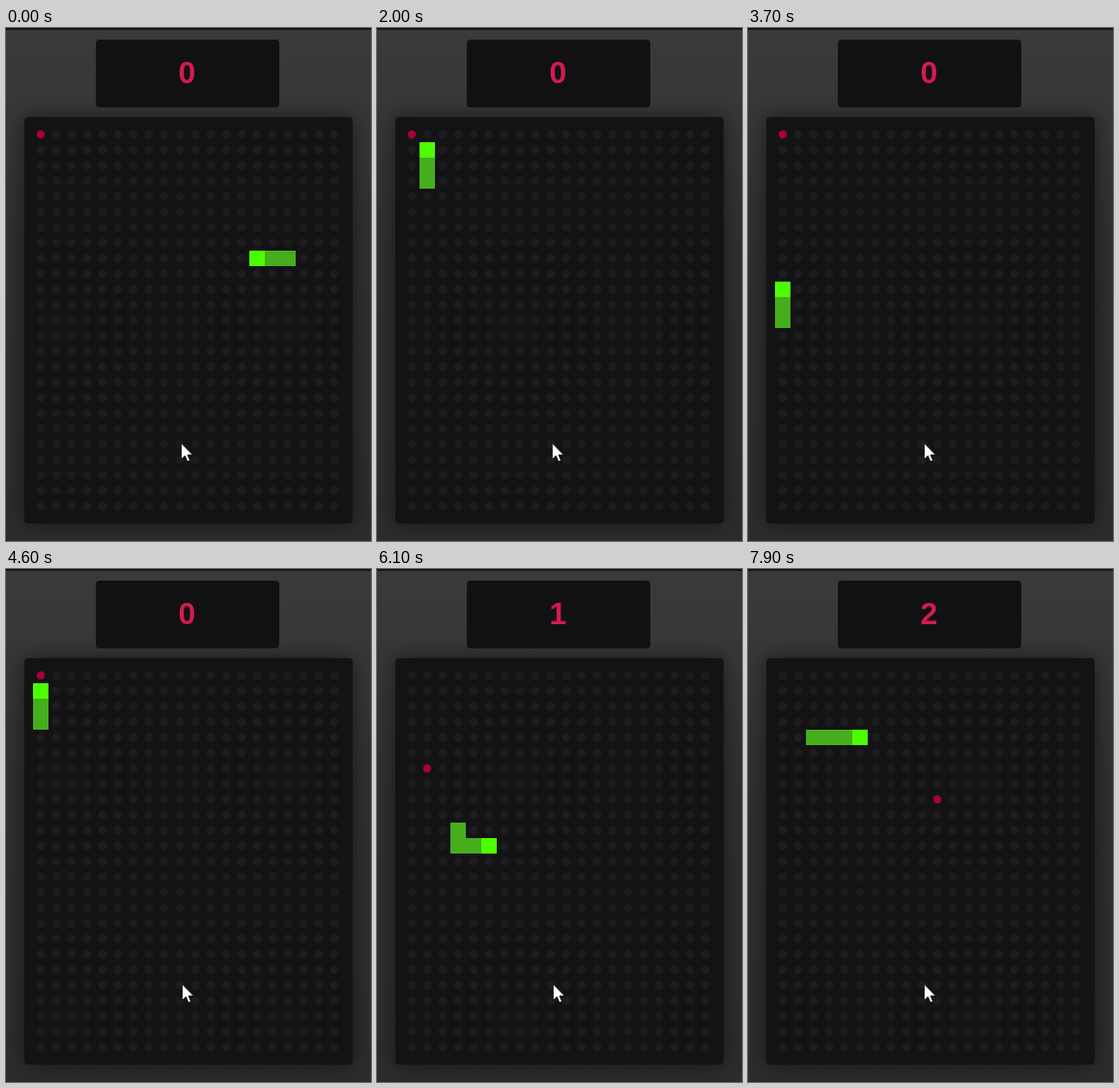
An HTML page for the animation above (8 s loop, 378 by 530 pixels).

```html
<!DOCTYPE html>
<html lang="en">
<head>
<meta charset="utf-8">
<title>Snake</title>
<style>
  html, body { margin: 0; width: 100%; height: 100%; overflow: hidden; background: #2c2b2d; }
  svg { display: block; width: 378px; height: 530px; }
  text { font: bold 32px "Liberation Sans", Arial, sans-serif; fill: #d11c4f; text-anchor: middle; }
</style>
</head>
<body>
<svg viewBox="0 0 378 530">
  <defs>
    <linearGradient id="page" x2="0" y2="1">
      <stop offset="0" stop-color="#3b393b"/>
      <stop offset=".15" stop-color="#383638"/>
      <stop offset=".4" stop-color="#302f31"/>
      <stop offset="1" stop-color="#2c2c2e"/>
    </linearGradient>
    <filter id="blur" x="-20%" y="-20%" width="140%" height="140%">
      <feGaussianBlur stdDeviation="10"/>
    </filter>
    <pattern id="dots" x="28" y="102" width="16" height="16" patternUnits="userSpaceOnUse">
      <circle cx="8" cy="8" r="4.4" fill="#1c1c1e"/>
    </pattern>
  </defs>
  <rect width="378" height="530" fill="url(#page)"/>
  <rect width="378" height="2" fill="#161518"/>
  <rect x="19" y="92" width="340" height="420" fill="#000" opacity=".5" filter="url(#blur)"/>
  <rect x="93" y="12" width="190" height="70" rx="4" fill="#111113"/>
  <rect x="19" y="92" width="340" height="420" rx="4" fill="#131315"/>
  <rect x="28" y="102" width="320" height="400" fill="url(#dots)"/>
  <text id="score" x="187.5" y="57">0</text>
  <g shape-rendering="crispEdges">
    <path id="body" fill="#46ad1c"/>
    <path id="head" fill="#4cff00"/>
  </g>
  <circle id="food" r="4.2" fill="#a60038"/>
  <path id="cursor" d="M0 0V16.5L3.9 12.9L6.4 18.8L9 17.7L6.5 12H11.8Z"
        fill="#fff" stroke="#111" stroke-width=".8"/>
</svg>
<script>
  const LOOP = 8000, TICK = 100, CELL = 16, COLS = 20, ROWS = 25, LEFT = 28, TOP = 102;
  const DIRS = { L: [-1, 0], R: [1, 0], U: [0, -1], D: [0, 1] };
  const ROUTE = "L15 U13 L1 U19 R3 D10 R3 U3 L5 U4 R4";
  const FOODS = [
    { tick: 0, at: [0, 0] },
    { tick: 48, at: [1, 6] },
    { tick: 73, at: [10, 8] }
  ];
  const START_LENGTH = 3;
  const $ = id => document.getElementById(id);

  // The trail begins with the tail cell of the first pose; edges wrap around.
  const trail = [[16, 8]];
  for (const leg of ROUTE.split(" ")) {
    const [dx, dy] = DIRS[leg[0]];
    for (let n = +leg.slice(1); n > 0; n--) {
      const [x, y] = trail[trail.length - 1];
      trail.push([(x + dx + COLS) % COLS, (y + dy + ROWS) % ROWS]);
    }
  }

  const square = ([x, y]) => `M${LEFT + x * CELL} ${TOP + y * CELL}h${CELL}v${CELL}h-${CELL}z`;

  function draw(time) {
    const tick = Math.floor((time % LOOP) / TICK);
    const score = FOODS.filter(f => f.tick <= tick).length - 1;
    const end = tick + START_LENGTH;
    const snake = trail.slice(end - START_LENGTH - score, end);
    const [fx, fy] = FOODS[score].at;

    $("head").setAttribute("d", square(snake.pop()));
    $("body").setAttribute("d", snake.map(square).join(""));
    $("food").setAttribute("cx", LEFT + (fx + 0.5) * CELL);
    $("food").setAttribute("cy", TOP + (fy + 0.5) * CELL);
    $("score").textContent = score;
    $("cursor").setAttribute("transform", `translate(${tick < 37 ? 181.5 : 182.5} 429)`);
  }

  const start = performance.now();
  function frame() {
    draw(performance.now() - start);
    requestAnimationFrame(frame);
  }
  frame();
</script>
</body>
</html>
```
